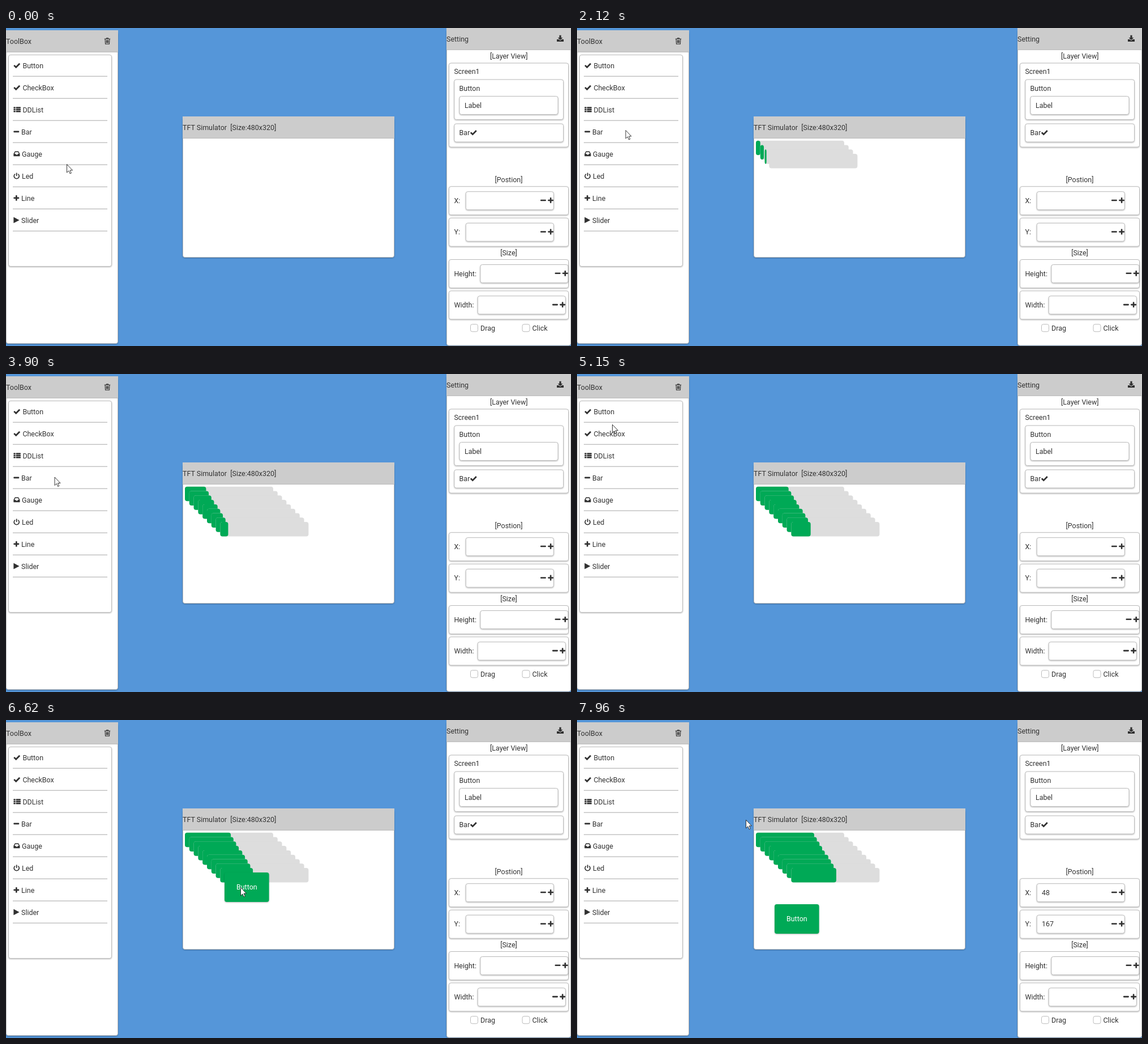
An HTML page for the animation above (8000 ms loop, 998x561 px).

```html
<!DOCTYPE html>
<html lang="en">
<head>
<meta charset="utf-8">
<title>TFT Simulator</title>
<style>
  html, body { margin: 0; width: 100%; height: 100%; overflow: hidden; background: #5596d9; }
  svg { display: block; width: 100vw; height: 100vh; }
  text { font: 12.48px Roboto, sans-serif; fill: #333; white-space: pre; }
  .mid { text-anchor: middle; }
  .box { fill: #fff; stroke: #bcbcbc; filter: drop-shadow(0 1.4px .8px #0004); }
  .check { fill: #fff; stroke: #bcbcbc; }
  .head { fill: #ccc; }
  .rule { stroke: #c4c4c4; stroke-width: 1.5; }
  .solid { fill: #303030; }
  .line { fill: none; stroke: #303030; }
  .green { fill: #00a956; }
  .track { fill: #ddd; }
  .raised { filter: drop-shadow(0 1.6px 1px #0004); }
</style>
</head>
<body>
<svg id="stage" viewBox="0 0 998 561"></svg>
<script>
const LOOP = 8000;
const stage = document.getElementById('stage');

function add(tag, attrs, parent = stage) {
  const node = document.createElementNS('http://www.w3.org/2000/svg', tag);
  for (const key in attrs) node.setAttribute(key, attrs[key]);
  parent.append(node);
  return node;
}
const rect = (cls, x, y, width, height, rx = 0, parent) =>
  add('rect', { class: cls, x, y, width, height, rx }, parent);
const path = (cls, d, width = 0, parent) =>
  add('path', { class: cls, d, 'stroke-width': width }, parent);
// Text is placed by the vertical centre of its capitals.
function label(str, x, mid, cls = '', parent) {
  const node = add('text', { x, y: mid + 4.3, class: cls }, parent);
  node.textContent = str;
  return node;
}
// Outlined box given by its outer edges.
const box = (x1, y1, x2, y2) =>
  rect('box', x1 + .5, y1 + .5, x2 - x1 - 1, y2 - y1 - 1, 3.5);

const icons = {
  tick: (x, y) => path('line', `M${x + .8} ${y}l3.5 3.4 6.5-6.6`, 2.7),
  minus: (x, y) => rect('solid', x, y - 1.3, 9.8, 2.6, .8),
  plus(x, y) {
    rect('solid', x, y - 1.3, 9.8, 2.6, .8);
    rect('solid', x + 3.6, y - 4.9, 2.6, 9.8, .8);
  },
  list(x, y) {
    for (const dy of [-4.7, -1.3, 2.1]) {
      rect('solid', x, y + dy, 3.3, 2.6, .5);
      rect('solid', x + 4.2, y + dy, 8.3, 2.6, .5);
    }
  },
  tray(x, y) {
    path('line', `M${x + .8} ${y}l2-3.7h5.4l2 3.7v3.5h-9.4z`, 1.5);
    path('solid', `M${x + .4} ${y}h3l1 1.7h2.4l1-1.7h3v4h-10.4z`);
  },
  power: (x, y) =>
    path('line', `M${x + 2.7} ${y - 3.3}a4.5 4.5 0 1 0 5.2 0M${x + 5.3} ${y - 5.3}v5.4`, 1.7),
  play: (x, y) => path('solid', `M${x} ${y - 5.4}l10.2 5.4-10.2 5.4z`),
  trash: (x, y) =>
    path('line', `M${x} ${y - 4}h10.4M${x + 3} ${y - 4}l.8-1.3h2.8l.8 1.3M${x + 1.3} ${y - 4}l.5 9h6.8l.5-9M${x + 3.7} ${y - 2}v5.2M${x + 5.2} ${y - 2}v5.2M${x + 6.7} ${y - 2}v5.2`, 1.15),
  download(x, y) {
    path('solid', `M${x + 4.4} ${y - 5.8}h3.2v4.2h2.8l-4.4 4.4-4.4-4.4h2.8z`);
    path('solid', `M${x} ${y + 1.4}h3.2l2.8 2.4 2.8-2.4h3.2v4h-12z`);
  }
};

rect('', 0, 0, 998, 561).setAttribute('fill', '#5596d9');

// Tool box
box(0, 6, 198, 557);
rect('head', 0, 4, 198, 38);
rect('', 0, 42, 198, 1).setAttribute('fill', '#bbb');
label('ToolBox', 0, 23.3);
icons.trash(173.8, 23.2);
box(4, 47, 187, 421);
const pressed = rect('', 5, 0, 181, 37);
pressed.setAttribute('fill', '#e6e6e6');
[
  ['tick', 'Button', 29.4], ['tick', 'CheckBox', 29.4], ['list', 'DDList', 29.4],
  ['minus', 'Bar', 27], ['tray', 'Gauge', 28], ['power', 'Led', 28],
  ['plus', 'Line', 27], ['play', 'Slider', 27]
].forEach(([icon, name, x], i) => {
  const mid = 66.2 + 39 * i;
  icons[icon](13.4, mid - .3);
  label(name, x, mid);
  add('path', { class: 'rule', d: `M12 ${85.2 + 39 * i}H179` });
});

// Simulator
box(312, 158, 686, 405);
rect('head', 312, 156, 374, 38.5);
rect('', 312, 194, 374, 1).setAttribute('fill', '#bbb');
label('TFT Simulator  [Size:480x320]', 312, 175.3);

// Settings
box(778, 2, 998, 560.5);
rect('head', 778, 0, 220, 38.5);
rect('', 778, 38, 220, 1).setAttribute('fill', '#bbb');
label('Setting', 778, 19.3);
icons.download(973, 18.5);
label('[Layer View]', 888.3, 49.8, 'mid');
box(782, 61.5, 994, 210.5);
label('Screen1', 791.4, 77);
box(791.4, 90.5, 985, 162);
label('Button', 800.6, 106.5);
box(800.5, 120, 975.5, 153);
label('Label', 810, 136.4);
box(791.4, 168.5, 985, 201.5);
label('Bar', 800.6, 184.6);
icons.tick(820, 184.2);

label('[Postion]', 888, 268, 'mid');
label('[Size]', 888, 397, 'mid');
for (const [name, mid, x] of [
  ['X:', 304.5, 811.8], ['Y:', 360, 811.8], ['Height:', 433.3, 837.4], ['Width:', 488.6, 832.8]
]) {
  box(782, mid - 25.3, 994, mid + 25.7);
  label(name, 791.4, mid);
  box(x, mid - 16.3, x + 156, mid + 16.7);
  icons.minus(x + 132.2, mid - .5);
  icons.plus(x + 145.4, mid - .5);
}
for (const [name, x] of [['Drag', 820], ['Click', 911.5]]) {
  rect('check', x + .5, 522.7, 13, 13, 3);
  label(name, x + 18, 529.3);
}
const readouts = [label('48', 821, 304.5), label('167', 821, 360)];

// Each click on "Bar" drops a bar whose value then counts up.
const STEP = 7.8;
const bars = Array.from({ length: 9 }, (_, i) => {
  const group = add('g', { transform: `translate(${316 + STEP * i} ${198.7 + STEP * i})` });
  rect('track', 0, 0, 156, 25.5, 4, group);
  return { group, start: 1550 + 175 * i, fill: rect('green', 0, 0, 0, 25.5, 4, group) };
});

const button = add('g', {});
rect('green raised', 0, 0, 78.6, 52, 4, button);
label('Button', 39.3, 25.7, 'mid', button).style.fill = '#fff';

const cursor = add('path', {
  d: 'M.5.5V15l3.3-3.1 2.3 5.1 2.2-1-2.2-5h4.4z',
  fill: '#fff', stroke: '#222', 'stroke-width': .9
});

// Rows of time, x, y.
const cursorPath = [
  [220, 107, 240], [620, 95, 249.3], [860, 95, 249.3], [1350, 85.5, 180],
  [3350, 85.5, 180], [3600, 85.5, 181.5], [4250, 85.5, 181.5], [5000, 62, 97],
  [5150, 62, 88.7], [5420, 55, 60], [5880, 55, 60], [6350, 454, 300],
  [6600, 414, 295], [6700, 414, 295], [6850, 411, 287], [7450, 374, 343],
  [7560, 374, 343], [7950, 298, 175.8]
];
const buttonPath = [[6850, 386, 269], [7450, 349, 325]];
const BUTTON_START = 5600, RELEASE = 7540, PRESS = 80, TICK = 97;

function place(node, rows, t) {
  const next = rows.findIndex(row => row[0] > t);
  let [, x, y] = next < 0 ? rows[rows.length - 1] : rows[Math.max(0, next - 1)];
  if (next > 0) {
    const [t0] = rows[next - 1], [t1, x1, y1] = rows[next];
    const p = (t - t0) / (t1 - t0), eased = p * p * (3 - 2 * p);
    x += (x1 - x) * eased;
    y += (y1 - y) * eased;
  }
  node.setAttribute('transform', `translate(${x} ${y})`);
}
const show = (node, on) => node.setAttribute('visibility', on ? 'visible' : 'hidden');
const pressing = (t, start) => t >= start - PRESS && t < start;

function draw(t) {
  for (const { group, start, fill } of bars) {
    show(group, t >= start);
    fill.setAttribute('width', 1.56 * Math.max(0, Math.floor((t - start) / TICK)));
  }
  const onButton = pressing(t, BUTTON_START);
  show(pressed, onButton || bars.some(bar => pressing(t, bar.start)));
  pressed.setAttribute('y', onButton ? 47.5 : 164.5);
  show(button, t >= BUTTON_START);
  readouts.forEach(node => show(node, t >= RELEASE));
  place(button, buttonPath, t);
  place(cursor, cursorPath, t);
}

const begin = performance.now();
function frame() {
  draw((performance.now() - begin) % LOOP);
  requestAnimationFrame(frame);
}
frame();
</script>
</body>
</html>
```
